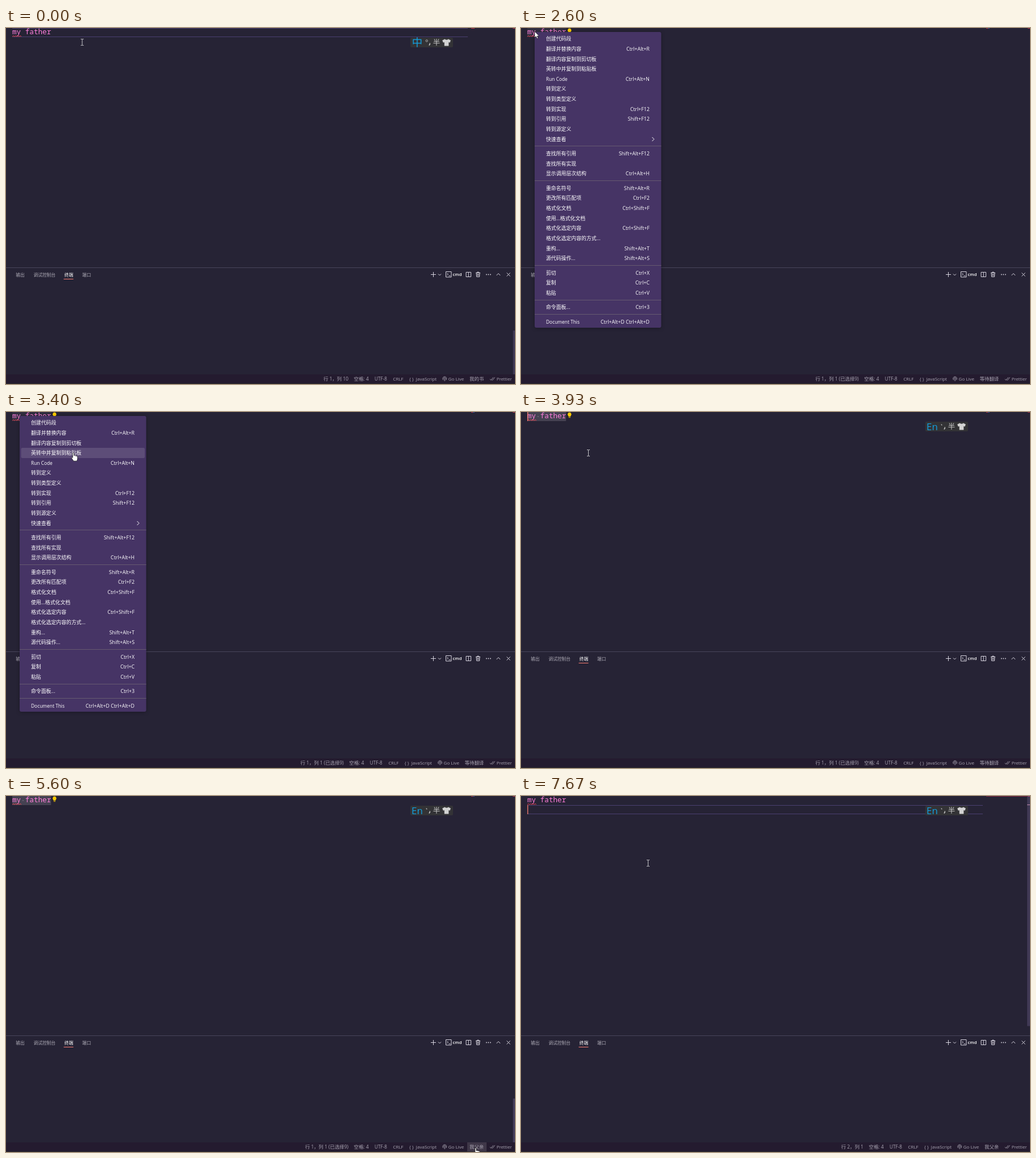
An HTML page that plays this animation: 895 by 626 pixels, repeating every 8 s.

```html
<!DOCTYPE html>
<html lang="zh-CN">
<head>
<meta charset="utf-8">
<title>Editor selection translate</title>
<style>
html, body { margin: 0; width: 100%; height: 100%; overflow: hidden; background: #262335; }
svg { display: block; width: 895px; height: 626px; }
text { font-family: 'Open Sans', 'Noto Sans CJK SC', 'Noto Sans CJK', 'Noto Sans', sans-serif; white-space: pre; }
.code { font: 500 12.65px 'Noto Sans Mono', 'DejaVu Sans Mono', monospace; fill: #ff7edb; }
.line { fill: none; stroke: #d6d3de; }
.dim { fill: none; stroke: #a9a4b2; stroke-width: .9; }
.pale { fill: none; stroke: #ccc; }
.pointer { fill: #fff; stroke: #111; stroke-width: .7; }
#menuBox { filter: drop-shadow(0 1px 3px rgba(0, 0, 0, .3)); }
</style>
</head>
<body>
<svg viewBox="0 0 895 626">
  <rect width="895" height="626" fill="#262335"/>

  <g id="editor">
    <path id="rowLine" d="M11 .5H812M11 15.5H812" stroke="#4a3f70"/>
    <rect id="sel" y="0" height="16" fill="#fff"/>
    <text class="code" x="11" y="11.4">my father</text>
    <circle id="dot" cx="30" cy="8" r=".8" fill="#8b8794"/>
    <path d="M11 15.2l2-1.7 2 1.7 2-1.7 2 1.7 2-1.7 2 1.7 2-1.7 2 1.7" fill="none" stroke="#fe4450" stroke-width=".9"/>
    <g id="bulb">
      <path d="M85.3 .8a3.4 3.4 0 0 1 2 6.1v1.1h-4v-1.1a3.4 3.4 0 0 1 2-6.1z" fill="#ffcc00"/>
      <path d="M83.6 8.8h3.4v1.3h-3.4z" fill="#d9ae0c"/>
    </g>
    <rect id="caret" width="1.3" height="16" fill="#f97e72"/>
    <path id="mapRed"/>
    <path id="mapBlue" d="M821 .5H824" stroke="#3c5a9c"/>
    <path d="M891 .5H895" stroke="#b8344c"/>
    <g id="editBar">
      <rect x="890" width="5" height="404.5" fill="#9d8bca" fill-opacity=".22"/>
      <path d="M890 15.5H895" stroke="#c58fae"/>
    </g>
  </g>

  <g id="panel">
    <path d="M0 421.5H895" stroke="#48455a"/>
    <path d="M101.5 441.5H118.5" stroke="#f97e72"/>
    <rect id="termBar" x="891.5" y="532" width="3.5" height="77" fill="#9d8bca" fill-opacity=".26"/>
    <g class="line">
      <path d="M747 433.5h9M751.5 429v9M760 432.5l2.5 2.5 2.5-2.5"/>
      <path d="M773.5 428.5h9.5v9.5h-9.5zM775.5 431l2 2-2 2M778.5 435.8h3"/>
      <path d="M809 429.5h8.5v8h-8.5zM813.3 429.5v8"/>
      <path d="M826 430.5h8M828.5 430.5v-1.3h3v1.3M827 431l.5 6.5h5l.5-6.5M829 432v4M831 432v4"/>
      <path d="M862.5 435l3.3-3.3 3.3 3.3M880.5 430.5l6 6M886.5 430.5l-6 6"/>
      <path d="M844.8 433.5h7.1" stroke-width="1.8" stroke-linecap="round" stroke-dasharray="0 3.5"/>
    </g>
  </g>

  <g id="status">
    <rect y="609" width="895" height="17" fill="#241b2f"/>
    <path d="M0 625.5H895" stroke="#2d2c2c"/>
    <rect id="statusHover" x="811" y="609" width="34" height="16" fill="#fff" fill-opacity=".12"/>
    <g id="statusLeft">
      <path class="dim" d="M769.3 619.3a3.4 3.4 0 1 1 4 0M770 617.6a1.7 1.7 0 1 1 2.6 0M771.3 616.5v4.5"/>
    </g>
    <path class="dim" d="M851 617.3l1.8 2 4-5M854.6 618.8l.7.7 4.3-5.3"/>
  </g>

  <g id="ime">
    <rect x="711" y="17" width="75" height="17" rx="2" fill="#333336"/>
    <g id="imeCn" fill="#129fe0">
      <text x="723" y="31.7" font-size="18.5" text-anchor="middle">中</text>
      <circle class="pale" cx="739.8" cy="22.5" r="1.7" stroke-width=".8"/>
    </g>
    <g id="imeEn" fill="#129fe0">
      <text x="723" y="32" font-size="17" text-anchor="middle" style="font-stretch:80%">En</text>
      <path class="pale" d="M738.8 21.7l1.5 1.6" stroke-width="1.2"/>
    </g>
    <path class="pale" d="M745.3 26.5q.8 2-1.5 4" stroke-width="1.4"/>
    <text x="757" y="29.7" font-size="12.5" fill="#ccc" text-anchor="middle">半</text>
    <path d="M771.5 19.5q3.2 2.5 6.4 0l4.1 2.3-1.6 4-2-.7v6.4h-7.6v-6.4l-2 .7-1.6-4z" fill="#d2d2d2"/>
  </g>

  <g id="menu">
    <rect id="menuBox" x="24" y="7" width="222.5" height="520" rx="3" fill="#463465"/>
    <rect id="hover" x="26.5" width="217.5" height="18" rx="2.5" fill="#5d4d78"/>
  </g>

  <g id="mouse">
    <path id="beam" d="M-2.5-5.5h2l.5.5.5-.5h2M0-5v10M-2.5 5.5h2l.5-.5.5.5h2" fill="none" stroke="#d8d8dc" stroke-width=".9"/>
    <path id="arrow" class="pointer" d="M0 0v11l2.5-2.3 1.7 4 1.9-.8-1.7-3.8h3.4z"/>
    <path id="hand" class="pointer" d="M-1.2.3q1.2-1.3 2.2 0v4.4q1.6-.8 2.2.3 1.5-.5 2.1.5 2-.3 2 1.3v3.7l-1.2 3.7h-5.7l-3.7-5.3q-.5-1.7 2.1-.7z"/>
  </g>
</svg>
<script>
const LOOP = 8000, CHAR = 7.58, LEFT = 11, LENGTH = 9, ROW = 17.65, GAP = 7.7;
const GREY = '#a9a4b2';
const NS = 'http://www.w3.org/2000/svg';
const $ = id => document.getElementById(id);
const set = (id, k, v) => $(id).setAttribute(k, v);
const show = (id, on) => set(id, 'visibility', on ? 'visible' : 'hidden');
const clamp = v => Math.max(0, Math.min(1, v));

function add(parent, tag, attrs, str = '') {
  const el = document.createElementNS(NS, tag);
  for (const k in attrs) el.setAttribute(k, attrs[k]);
  el.textContent = str;
  return $(parent).appendChild(el);
}

const label = (parent, str, x, y, size, fill, anchor = 'start', weight = 400) =>
  add(parent, 'text', { x, y, fill, 'font-size': size, 'text-anchor': anchor, 'font-weight': weight }, str);
const stroke = (parent, d, color) => add(parent, 'path', { d, fill: 'none', stroke: color });

// Context menu: '-' separates groups, '|' separates label and shortcut
const entries = `创建代码段
翻译并替换内容|Ctrl+Alt+R
翻译内容复制到剪切板
英转中并复制到粘贴板
Run Code|Ctrl+Alt+N
转到定义
转到类型定义
转到实现|Ctrl+F12
转到引用|Shift+F12
转到源定义
快速查看|>
-
查找所有引用|Shift+Alt+F12
查找所有实现
显示调用层次结构|Ctrl+Alt+H
-
重命名符号|Shift+Alt+R
更改所有匹配项|Ctrl+F2
格式化文档|Ctrl+Shift+F
使用...格式化文档
格式化选定内容|Ctrl+Shift+F
格式化选定内容的方式...
重构...|Shift+Alt+T
源代码操作...|Shift+Alt+S
-
剪切|Ctrl+X
复制|Ctrl+C
粘贴|Ctrl+V
-
命令面板...|Ctrl+3
-
Document This|Ctrl+Alt+D Ctrl+Alt+D`.split('\n');

const rows = [];
let rowY = 19;
for (const entry of entries) {
  if (entry === '-') {
    stroke('menu', `M24 ${Math.floor(rowY - 5.2) + .5}H246.5`, '#665a70');
    rowY += GAP;
    continue;
  }
  const [name, keys] = entry.split('|');
  const size = /^[A-Z]/.test(name) ? 8.4 : 8.9;
  label('menu', name, 44, rowY + 3.2, size, '#fff', 'start', 500);
  if (keys === '>') stroke('menu', `M230.5 ${rowY - 3.5}l3.5 3.5-3.5 3.5`, '#fff');
  else if (keys) label('menu', keys, 226, rowY + 3.2, 8.8, '#fff', 'end', 500);
  rows.push(rowY);
  rowY += ROW;
}

// Panel tabs, a fixed gap apart
let tabX = 17.3;
for (const name of ['输出', '调试控制台', '终端', '端口']) {
  const on = name === '终端';
  label('panel', name, tabX, 436.5, 7.7, on ? '#fff' : '#aeabb6', 'start', on ? 500 : 400);
  tabX += name.length * 7.7 + 15.8;
}
label('panel', 'cmd', 793.5, 436.2, 7.6, '#fff', 'middle', 600);

// Status bar
const item = (parent, str, x, size, anchor = 'middle') => label(parent, str, x, 620, size, GREY, anchor);
const position = item('statusLeft', '', 602, 8.4, 'end');
const result = item('status', '', 840.2, 8.4, 'end');
item('statusLeft', '空格: 4', 624.8, 8.4);
item('statusLeft', 'UTF-8', 659, 8.2);
item('statusLeft', 'CRLF', 689.6, 7.9);
item('statusLeft', '{ }', 713, 7.9);
item('statusLeft', 'JavaScript', 739, 8);
item('statusLeft', 'Go Live', 791.5, 8);
item('status', 'Prettier', 876, 7.7);

// Pointer stops: time, x, y
const stops = [
  [0, 134, 25], [650, 80, 8], [800, 78, 8], [1100, 20, 8], [1330, 12, 4], [2000, 12, 4],
  [2530, 24, 6], [2730, 24, 6], [3100, 117, 69], [3400, 118.5, 72], [4000, 118.5, 72],
  [4870, 690, 549], [5600, 826, 619], [5930, 826, 619], [6530, 223.5, 118], [LOOP, 223.5, 118]
];

function pointer(t) {
  const i = stops.findIndex(s => s[0] > t);
  const [t0, x0, y0] = stops[i - 1], [t1, x1, y1] = stops[i];
  const k = (t - t0) / (t1 - t0), ease = k * k * (3 - 2 * k);
  return [x0 + (x1 - x0) * ease, y0 + (y1 - y0) * ease];
}

const DRAG = 800, PICKED = 1330, MENU = 2600, CLICK = 3930, DESELECT = 6600, ENTER = 7530;

// The caret restarts its blink at each of these actions
const actions = [70, DRAG, 1300, CLICK, DESELECT, ENTER];
function caretOn(t) {
  const last = actions.filter(a => a <= t).pop();
  return last !== undefined && (t - last) % 1000 < 500;
}

function column(t, x) {
  if (t < DRAG) return LENGTH;
  if (t < PICKED) return Math.round(clamp((x - LEFT) / CHAR / LENGTH) * LENGTH);
  return t >= DESELECT && t < ENTER ? LENGTH : 0;
}

function draw(t) {
  const [mx, my] = pointer(t);
  const menuOpen = t >= MENU && t < CLICK;
  const selected = t >= DRAG && t < DESELECT;
  const newLine = t >= ENTER;
  const col = column(t, mx), caretX = LEFT + col * CHAR;

  // Selection and caret
  set('sel', 'x', caretX);
  set('sel', 'width', (LENGTH - col) * CHAR);
  set('sel', 'fill-opacity', menuOpen ? .05 : .14);
  show('sel', selected);
  show('dot', selected && col <= 2);
  set('caret', 'x', caretX + .2);
  set('caret', 'y', newLine ? 16 : 0);
  show('caret', caretOn(t) && !menuOpen);
  show('rowLine', !selected);
  set('rowLine', 'transform', `translate(0 ${newLine ? 16 : 0})`);
  show('bulb', t >= PICKED && t < 6870);

  // Overview and scrollbars
  show('mapBlue', selected);
  set('mapRed', 'd', newLine ? 'M818 .5H890' : 'M818 .5H824');
  set('mapRed', 'stroke', newLine ? '#862b42' : '#c23349');
  show('editBar', newLine);
  set('termBar', 'opacity', t < 4800 ? .8 * clamp(1 - t / 800) : clamp((6800 - t) / 600));

  // Input method bar
  const chinese = t < 470;
  show('ime', !menuOpen);
  show('imeCn', chinese);
  show('imeEn', !chinese && !menuOpen);

  // Status bar
  const waiting = t >= MENU && t < CLICK + 200;
  position.textContent = `行 ${newLine ? 2 : 1}，列 ${col + 1}` + (selected ? ` (已选择${LENGTH - col})` : '');
  result.textContent = waiting ? '等待翻译' : t < MENU ? '我的书' : '我父亲';
  set('statusLeft', 'transform', `translate(${waiting ? -8.2 : 0} 0)`);
  show('statusHover', my > 609 && mx > 811);

  // Menu
  const row = rows.findIndex(y => Math.abs(y - my) <= ROW / 2);
  const hovering = menuOpen && mx > 27 && row >= 0;
  show('menu', menuOpen);
  show('hover', hovering);
  if (hovering) set('hover', 'y', Math.round(rows[row] - 9));

  // Pointer
  const overSelection = t >= PICKED && selected && my < 16;
  const overHeader = my > 421 && my < 446;
  const kind = hovering || my > 609 ? 'hand' : overSelection || overHeader || menuOpen ? 'arrow' : 'beam';
  for (const id of ['beam', 'arrow', 'hand']) show(id, id === kind);
  set('mouse', 'transform', `translate(${mx} ${my})`);
}

function frame() {
  draw(performance.now() % LOOP);
  requestAnimationFrame(frame);
}
frame();
</script>
</body>
</html>
```
